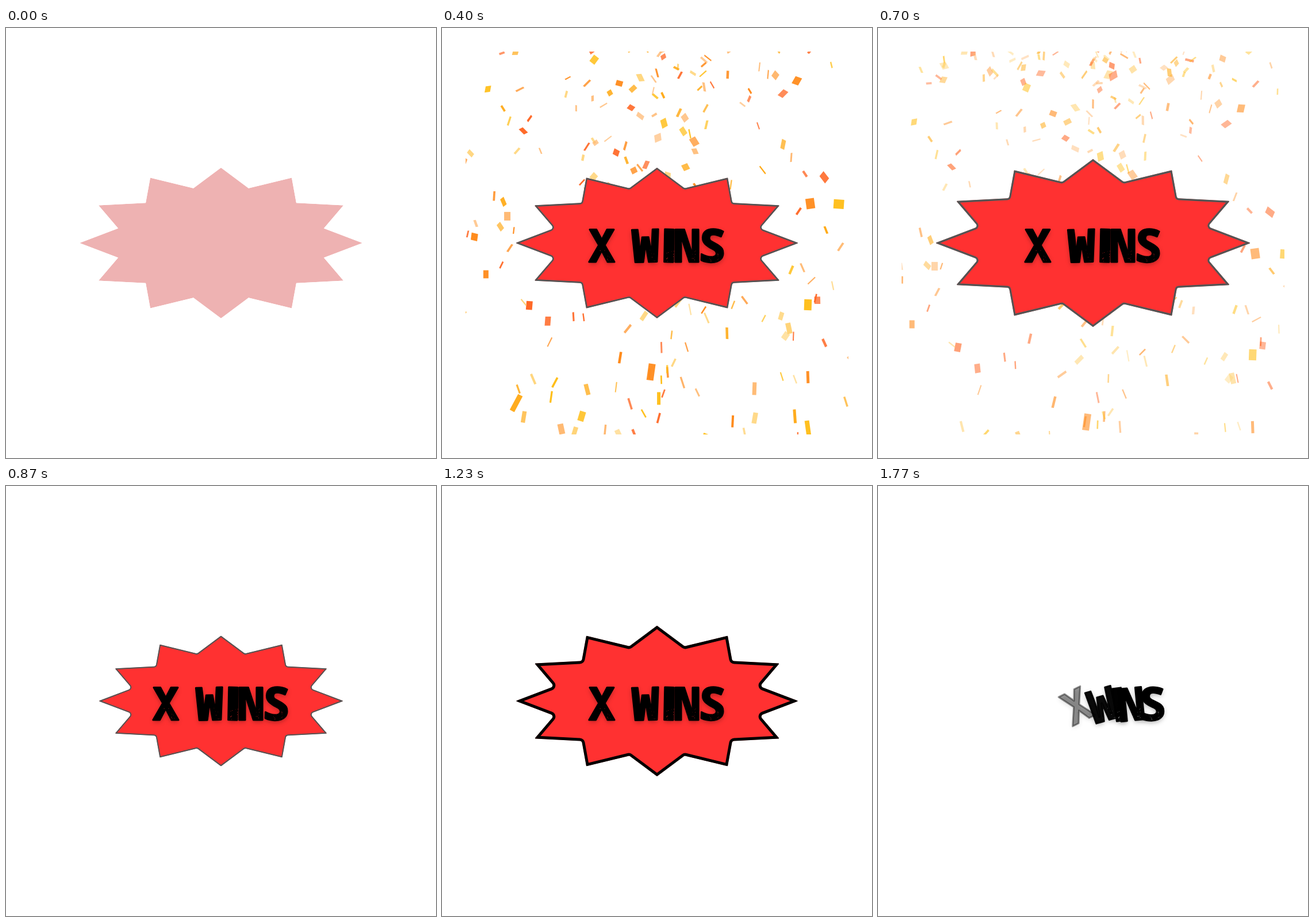
Animation of 748 by 748 pixels, one loop 1.81 s. Source, as an HTML page with a canvas:

```html
<!DOCTYPE html>
<html lang="en">
<head>
<meta charset="utf-8">
<title>X WINS</title>
<style>
html, body { margin: 0; width: 100%; height: 100%; overflow: hidden; background: #fff; }
canvas { display: block; }
</style>
</head>
<body>
<canvas id="stage" width="748" height="748" aria-label="X WINS"></canvas>
<script>
const ctx = document.getElementById('stage').getContext('2d');
const LOOP = 1810, STEP = 100 / 3, MID = 374;
const RED = '#ff3131';
const COLORS = ['#ffbd14', '#ff8b1c', '#ffb870', '#ffd272', '#ff6420', '#ffa812'];

const clamp = v => Math.max(0, Math.min(1, v));
const span = (t, a, b) => clamp((t - a) / (b - a));
const smooth = u => u * u * (3 - 2 * u);
const easeCubic = u => u < .5 ? 4 * u ** 3 : 1 - 4 * (1 - u) ** 3;

function seeded(seed) {
  return () => {
    seed = (seed * 1664525 + 1013904223) % 4294967296;
    return seed / 4294967296;
  };
}

// Large pieces: x, y, width, height, tilt in degrees, colour
const large = [
  [364, 550, 12, 29, 8, 1], [137, 604, 9, 31, 28, 5], [452, 674, 11, 35, 20, 0],
  [341, 692, 8, 26, 5, 0], [302, 692, 6, 33, 27, 0], [233, 662, 8, 34, 17, 3],
  [377, 596, 6, 22, 0, 0], [538, 579, 7, 22, 2, 2], [628, 648, 8, 27, -8, 0],
  [606, 627, 5, 24, -4, 5], [628, 433, 13, 19, 2, 0], [702, 416, 9, 22, 2, 0],
  [632, 257, 15, 18, -8, 1], [680, 258, 18, 16, 4, 0], [596, 474, 9, 19, -12, 3],
  [122, 279, 11, 15, 0, 2], [86, 380, 9, 14, 0, 1], [628, 559, 5, 21, -2, 1]
].map(([x, y, w, h, tilt, c]) => ({
  x, y, w, h, a: tilt * Math.PI / 180, skew: 0, spin: 0, v: .29, alpha: .95, color: COLORS[c]
}));

const rnd = seeded(71);
const small = Array.from({ length: 350 }, () => {
  const y = -70 + 770 * rnd() ** 2.3;
  const depth = clamp((y - 41) / 600);
  const wide = rnd() < .28;
  return {
    x: MID + 400 * (rnd() + rnd() - 1) * (1 + .25 * depth),
    y,
    w: wide ? 7 + 5 * rnd() : 2 + 2.5 * rnd(),
    h: (wide ? 8 : 9) + 7 * rnd() + 6 * depth,
    a: (rnd() - .5) * (2.3 - 1.5 * depth),
    skew: (rnd() - .5) * .9 * (1 - depth),
    spin: (rnd() - .5) * .002,
    v: .15 + .05 * rnd() + .12 * depth,
    alpha: .65 + .35 * rnd(),
    color: COLORS[Math.floor(rnd() * COLORS.length)]
  };
});
const confetti = small.concat(large);

function drawConfetti(t) {
  const show = span(t, 0, 70) * (1 - span(t, 640, 800));
  if (!show) return;
  const dt = t - 233;
  ctx.save();
  ctx.beginPath();
  ctx.rect(41, 41, 666, 666);
  ctx.clip();
  for (const p of confetti) {
    ctx.save();
    ctx.translate(MID + (p.x - MID) * (1 + .0002 * dt), p.y + p.v * dt);
    ctx.rotate(p.a + p.spin * dt);
    ctx.transform(1, p.skew, 0, 1, 0, 0);
    ctx.globalAlpha = show * p.alpha;
    ctx.fillStyle = p.color;
    ctx.fillRect(-p.w / 2, -p.h / 2, p.w, p.h);
    ctx.restore();
  }
  ctx.restore();
}

// One beat: quick dip, swell, settle
function beat(u) {
  if (u < .25) return 1 - .14 * (1 - (1 - u / .25) ** 5);
  if (u < .62) return .86 + .274 * easeCubic((u - .25) / .37);
  return 1.134 - .134 * smooth((u - .62) / .38);
}

function starPath(scale, tip, notch) {
  const pts = Array.from({ length: 24 }, (_, i) => {
    const a = i * Math.PI / 12, k = scale * (i % 2 ? .753 : 1);
    return [MID + 246 * k * Math.cos(a), MID + 131 * k * Math.sin(a)];
  });
  const [p, q] = [pts[23], pts[0]];
  ctx.beginPath();
  ctx.moveTo((p[0] + q[0]) / 2, (p[1] + q[1]) / 2);
  pts.forEach((pt, i) => ctx.arcTo(...pt, ...pts[(i + 1) % 24], i % 2 ? notch : tip));
  ctx.closePath();
}

function drawStar(t) {
  const out = span(t, 1600, 1750);
  const beating = t < 1230;
  const scale = beating ? beat(t % 410 / 410) : 1;
  const line = beating ? 2 + (scale - .86) * 4.5 : 5;
  ctx.save();
  ctx.translate(48 * out * out, 0);
  ctx.globalAlpha = t < 30 ? 1 : (1 - out) * (.5 + .5 * span(t, 0, 70));
  starPath(scale, t < 30 ? 0 : .8, t < 30 ? 0 : 4);
  ctx.clip();
  ctx.fillStyle = t < 30 ? '#eeb2b2' : RED;
  ctx.fill();
  if (t >= 30) {
    ctx.lineWidth = line * 2;
    ctx.lineJoin = 'round';
    ctx.strokeStyle = beating ? '#545454' : '#000';
    ctx.stroke();
  }
  ctx.restore();
}

const MONO = '900 79px "Noto Sans Mono", monospace';
const SANS = '900 78px Inter, sans-serif';
// slot: place in the typed line, counting the space
const letters = [
  { ch: 'X', x: 278, slot: 0, font: MONO, tilt: 0 },
  { ch: 'W', x: 354, slot: 2, font: MONO, tilt: -.03 },
  { ch: 'I', x: 395, slot: 3, font: SANS, tilt: .02 },
  { ch: 'N', x: 426, slot: 4, font: MONO, tilt: 0 },
  { ch: 'S', x: 470, slot: 5, font: MONO, tilt: .03 }
];

function drawLetter(l, t) {
  const out = clamp((t - 1600) / 167 - .135 * l.slot);
  const move = out * out;
  ctx.save();
  ctx.translate(l.x + 68 * move, 379 + 4 * move);
  ctx.rotate(l.tilt - .47 * move);
  ctx.globalAlpha = 1 - .6 * out ** 8;
  ctx.font = l.font;
  ctx.textAlign = 'center';
  ctx.fillStyle = ctx.strokeStyle = '#000';
  ctx.lineWidth = 3;
  ctx.lineJoin = 'round';
  ctx.shadowColor = 'rgba(0,0,0,.35)';
  ctx.shadowBlur = 8;
  ctx.shadowOffsetY = 3;
  ctx.fillText(l.ch, 0, 28);
  ctx.shadowColor = 'transparent';
  ctx.strokeText(l.ch, 0, 28);
  // worn specks
  const r = seeded(l.slot * 97 + 5);
  ctx.globalAlpha *= .55;
  ctx.fillStyle = t < 1700 ? RED : '#fff';
  for (let i = 0; i < 14; i++) {
    const size = .5 + .8 * r();
    ctx.fillRect((r() - .25) * 20, 27 - 20 * r() ** 1.5, size, size);
  }
  ctx.restore();
}

function draw(t) {
  ctx.fillStyle = '#fff';
  ctx.fillRect(0, 0, 748, 748);
  drawConfetti(t);
  drawStar(t);
  for (const l of letters) {
    if (t >= 57 * (l.slot + 1)) drawLetter(l, t);
  }
}

const start = performance.now();
function tick() {
  const t = (performance.now() - start) % LOOP;
  draw(Math.min(53, Math.floor((t + 3.4) / STEP)) * STEP);
  requestAnimationFrame(tick);
}
tick();
</script>
</body>
</html>
```
